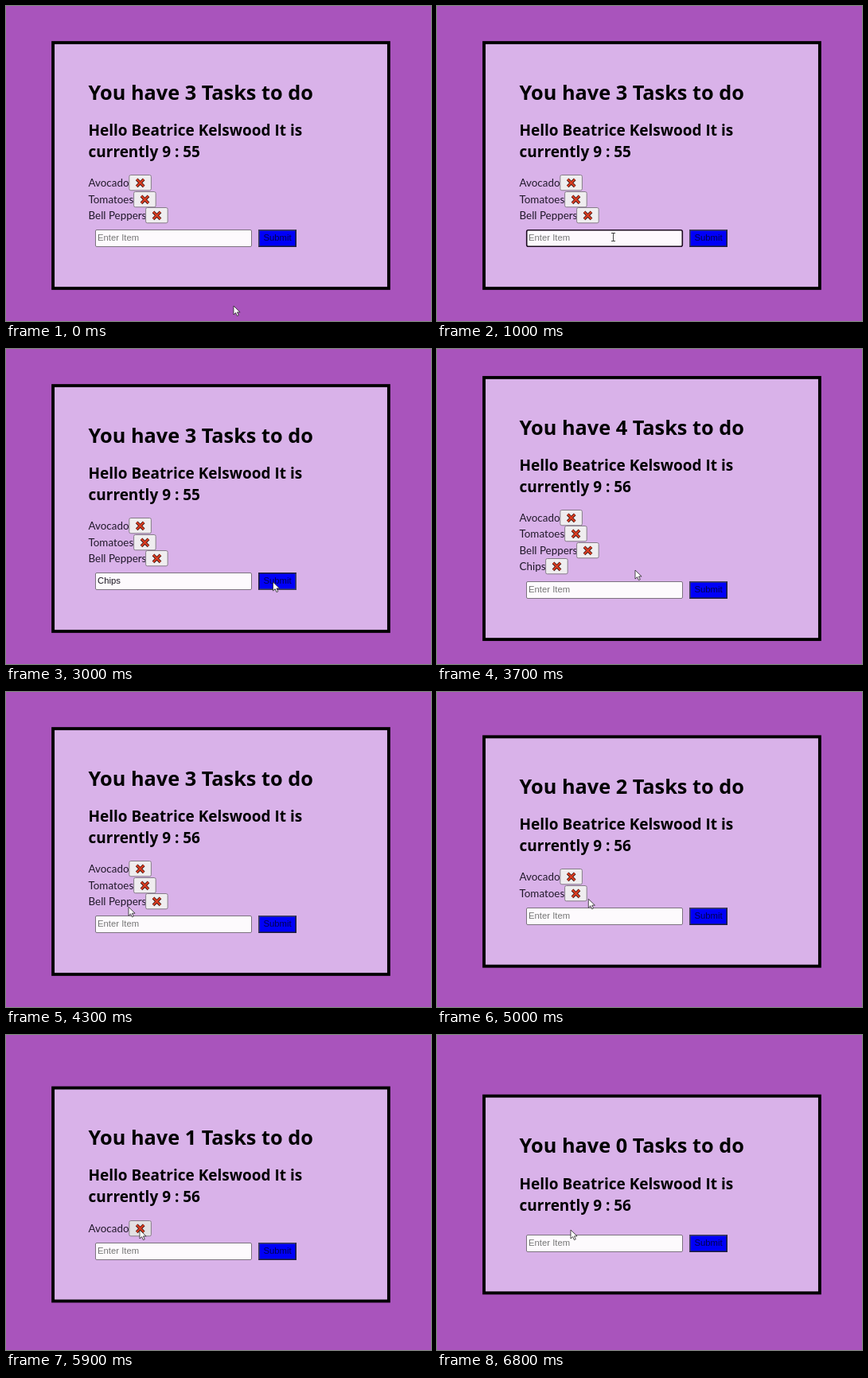
Recreate the animation shown at these times as an HTML page. Size 534 by 396 pixels, loop 6900 ms.

```html
<!DOCTYPE html>
<html lang="en">
<head>
<meta charset="utf-8">
<title>Task list</title>
<style>
  html, body { margin: 0; width: 100%; height: 100%; overflow: hidden; background: #a954bc; }
  svg { display: block; width: 534px; height: 396px; }
  text { font-family: "Open Sans", "Noto Sans", sans-serif; white-space: pre; }
  .h1 { font-size: 25.3px; font-weight: 700; }
  .h2 { font-size: 19px; font-weight: 700; }
  .item { font: 13.4px Lato, "Open Sans", sans-serif; fill: #20182a; }
  .ui { font: 11.3px "Liberation Sans", Arial, sans-serif; }
</style>
</head>
<body>
<svg id="stage" viewBox="0 0 534 396"></svg>
<script>
const LOOP = 6900, STEP = 100, MOVE = 600;
const TYPE = 1500, KEY = 150, PRESS = 2900, SUBMIT = 3100, REMOVE = 4200, EVERY = 700;
const stage = document.getElementById("stage");

// Label and left edge of its delete button
const items = [["Avocado", 154.8], ["Tomatoes", 160.6], ["Bell Peppers", 175.6], ["Chips", 136.6]];
// Pointer stops: arrival time, x, y
const stops = [
  [0, 286, 377], [700, 221.5, 290.5], [PRESS, 335.5, 293], [3700, 249, 278],
  [4100, 151, 271], [4800, 191.5, 261], [5500, 175, 250], [5900, 168, 245]
];

const clamp = (v, lo, hi) => Math.min(hi, Math.max(lo, v));
const rect = (x, y, w, h, fill, extra = "") =>
  `<rect x="${x}" y="${y}" width="${w}" height="${h}" fill="${fill}" ${extra}/>`;
const text = (x, y, cls, str, extra = "") =>
  `<text x="${x}" y="${y}" class="${cls}" ${extra}>${str}</text>`;
const path = (d, extra) => `<path d="${d}" ${extra}/>`;
const inside = ([px, py], x, y, w, h) => px >= x && px < x + w && py >= y && py < y + h;

// Each move ends at its stop's arrival time
function pointerAt(t) {
  let [, x, y] = stops[0];
  for (let i = 1; i < stops.length; i++) {
    const [end, tx, ty] = stops[i];
    const start = Math.max(stops[i - 1][0], end - MOVE);
    const u = clamp((t - start) / (end - start), 0, 1), e = u * u * (3 - 2 * u);
    x += (tx - x) * e;
    y += (ty - y) * e;
  }
  return [x, y];
}

function taskCount(t) {
  const removed = Math.max(0, Math.floor((t - REMOVE) / EVERY) + 1);
  return Math.max(0, (t < SUBMIT ? 3 : 4) - removed);
}

function row([label, x], y, p) {
  const fill = inside(p, x, y, 28, 20) ? "#e3e1e3" : "#efedef";
  const cross = `M${x + 9.4} ${y + 5.8}l9 9m0 -9l-9 9`;
  return text(103.5, y + 14.5, "item", label) +
    rect(x, y + .5, 27.6, 19.3, fill, 'rx="2" stroke="#857b88"') +
    path(cross, 'stroke="#3b1a18" stroke-width="3.8"') +
    path(cross, 'stroke="#dc3c20" stroke-width="2.2"');
}

function form(y, typed, focused, pressed) {
  const field = focused
    ? rect(112.7, y + .7, 195.6, 20.6, "#fdf9fd", 'rx="2" stroke="#1c0a20" stroke-width="1.6"')
    : rect(112.5, y + .5, 196, 21, "#fdfafd", 'rx="1.5" stroke="#7c727f"');
  const edge = pressed ? ["#20203a", "#404058"] : ["#404058", "#20203a"];
  return field +
    text(115, y + 14.4, "ui", typed || "Enter Item", `fill="${typed ? "#1a1420" : "#757575"}"`) +
    rect(317, y, 48, 22, edge[1]) +
    path(`M317 ${y + 22}v-22h48l-2 2h-44v18z`, `fill="${edge[0]}"`) +
    rect(318.6, y + 1.6, 44.8, 18.8, "#0000f8") +
    text(341, y + 14.4, "ui", "Submit", 'text-anchor="middle" fill="#000050"');
}

function pointer([x, y], beam) {
  return beam
    ? path(`M${x - 2.5} ${y - 5}h5m-2.5 0v10m-2.5 0h5`, 'fill="none" stroke="#333" stroke-width=".9"')
    : path(`M${x} ${y}v11l2.6 -2.4l1.8 4l1.9 -.8l-1.8 -3.9h3.6z`,
        'fill="#fff" stroke="#222" stroke-width=".8"');
}

function draw(t) {
  const n = taskCount(t);
  const d = (3 - n) * 10.2;
  const formY = Math.round(281.3 - d);
  const p = pointerAt(t);
  const letters = clamp(Math.floor((t - TYPE) / KEY) + 1, 0, 5);
  const typed = t < SUBMIT ? "Chips".slice(0, letters) : "";

  stage.innerHTML =
    rect(0, 0, 534, 396, "#a954bc") +
    rect(59.1, 46.1 + d, 421.8, 308.8 - 2 * d, "#d9b2e9", 'stroke="#000" stroke-width="3.9"') +
    text(103.5, 117.8 + d, "h1", `You have ${n} Tasks to do`) +
    text(103.5, 163 + d, "h2", "Hello Beatrice Kelswood It is") +
    text(103.5, 190 + d, "h2", `currently 9 : ${t < SUBMIT ? 55 : 56}`) +
    items.slice(0, n).map((it, i) => row(it, Math.round(212.2 + d + 20.4 * i), p)).join("") +
    form(formY, typed, t >= 900 && t < PRESS, t >= PRESS && t < SUBMIT) +
    pointer(p, inside(p, 112, formY, 197, 22));
}

let last = -1;
function tick(now) {
  const t = Math.floor(now % LOOP / STEP) * STEP;
  if (t !== last) draw(last = t);
  requestAnimationFrame(tick);
}
tick(performance.now());
</script>
</body>
</html>
```
